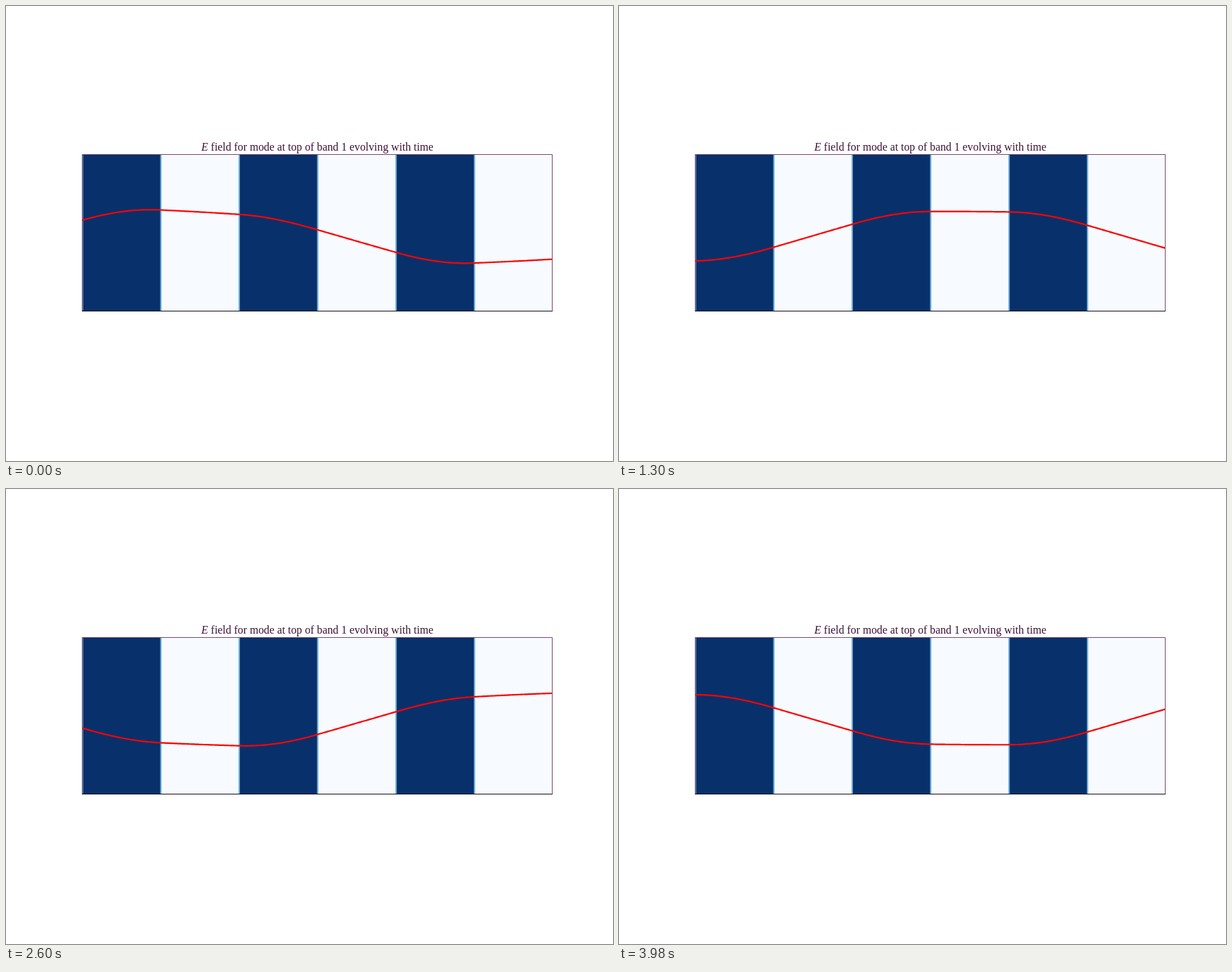
An HTML page for the animation above (4000 ms loop, 864x648 px).

```html
<!DOCTYPE html>
<html lang="en">
<head>
<meta charset="utf-8">
<title>Field mode</title>
<style>
html, body { margin: 0; width: 100%; height: 100%; overflow: hidden; background: #fff; }
svg { display: block; }
text { font: 15.8px "Liberation Serif", "Times New Roman", serif; fill: #3c1236; }
</style>
</head>
<body>
<svg width="864" height="648" viewBox="0 0 864 648">
  <clipPath id="box"><rect x="108" y="211" width="670" height="224"/></clipPath>
  <text x="443.2" y="206.3" text-anchor="middle"><tspan font-style="italic">E</tspan> field for mode at top of band 1 evolving with time</text>
  <g clip-path="url(#box)">
    <g id="layers"></g>
    <path id="wave" fill="none" stroke="#f00" stroke-width="2.2" stroke-linejoin="round" stroke-linecap="square"/>
  </g>
  <path d="M108.5 435V211.5H777.5V435" fill="none" stroke="#7d4a64"/>
  <path d="M108 434.5H778" stroke="#15101a"/>
</svg>
<script>
const LEFT = 108.5, LAYER = 111.6, COUNT = 6, MIDDLE = 328.4;
const AMPLITUDE = 39;              // at the layer boundaries
const DENSE = 1.055, THIN = 0.25;  // optical phase across each kind of layer
const PAIR_SHIFT = 1.558;          // Bloch phase gained across two layers
const DENSE_SHIFT = 0.694;         // part of it gained in the dense layer
const STEPS = 40;

const rect = (x, width, fill) =>
  `<rect x="${x}" y="211" width="${width}" height="224" fill="${fill}"/>`;

let layers = "";
for (let i = 0; i < COUNT; i++)
  layers += rect(LEFT + i * LAYER, LAYER + 1, i % 2 ? "#f7fbff" : "#08306b");
for (let i = 0; i < COUNT; i++)
  layers += rect(LEFT + i * LAYER - 0.6, 1.9, "#6baed6");
document.getElementById("layers").innerHTML = layers;

const boundary = (i, phase) =>
  AMPLITUDE * Math.cos(phase - (i >> 1) * PAIR_SHIFT - (i % 2) * DENSE_SHIFT);

function wavePath(phase) {
  const points = [];
  for (let i = 0; i < COUNT; i++) {
    const w = i % 2 ? THIN : DENSE;
    const a = boundary(i, phase), b = boundary(i + 1, phase);
    for (let j = 0; j <= STEPS; j++) {
      const s = j / STEPS;
      const y = (a * Math.sin(w * (1 - s)) + b * Math.sin(w * s)) / Math.sin(w);
      points.push((LEFT + (i + s) * LAYER).toFixed(2) + " " + (MIDDLE + y).toFixed(2));
    }
  }
  return "M" + points.join("L");
}

const wave = document.getElementById("wave");
const start = performance.now();
function draw() {
  const time = Math.max(0, performance.now() - start) % 4000;
  wave.setAttribute("d", wavePath(-2.21 - 0.07 * Math.floor(time / 20)));
  requestAnimationFrame(draw);
}
draw();
</script>
</body>
</html>
```
